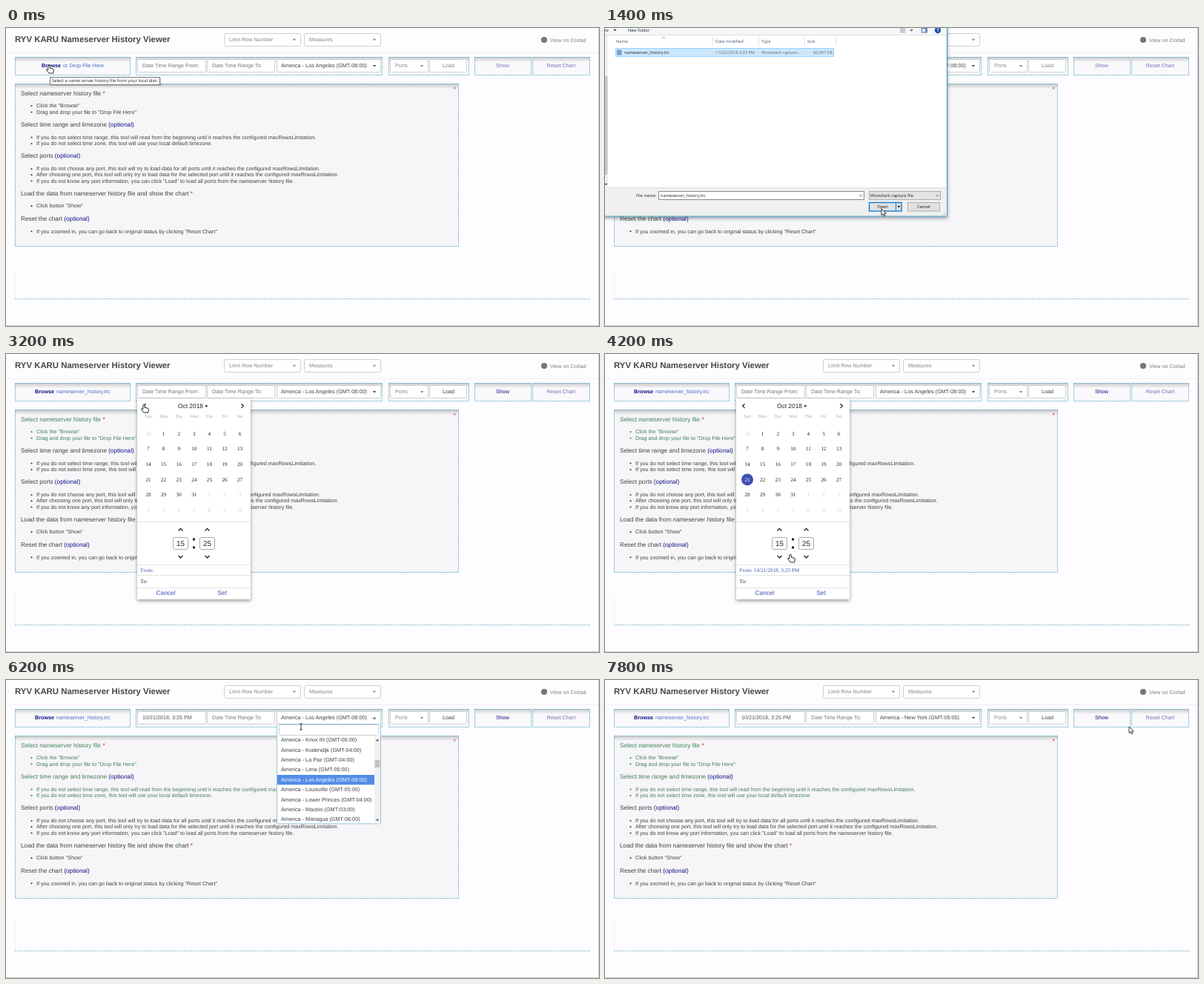
An HTML page for the animation above (8000 ms loop, 800 by 402 pixels).

```html
<!DOCTYPE html>
<html lang="en">
<head>
<meta charset="utf-8">
<title>Nameserver History Viewer</title>
<style>
  html, body { margin: 0; width: 100%; height: 100%; overflow: hidden; background: #fdfcfe; }
  svg { display: block; }
  text { font-family: "Liberation Sans", Arial, sans-serif; text-rendering: geometricPrecision; white-space: pre; }
  .serif { font-family: "Liberation Serif", "Times New Roman", serif; }
  .ui { font-family: "Open Sans", "Noto Sans", sans-serif; }
</style>
</head>
<body>
<svg id="stage" width="800" height="402" viewBox="0 0 800 402"></svg>
<script>
const LOOP = 8000, STEP = 200;
const INK = '#404042', NAVY = '#10108a', GREEN = '#41805a', GREY = '#858585', TEAL = '#5fb0cb', INDIGO = '#3f51b5';

// Each track is a list of [start in ms, value]; a value holds until the next one.
const tracks = {
  tip: [[0, true], [400, false]],
  dialog: [[0, false], [800, true], [1600, false]],
  fileChosen: [[0, false], [1200, true]],
  loaded: [[0, false], [1800, true]],
  focus: [[0, false], [2400, true], [2600, false]],
  calendar: [[0, null], [2600, 'Nov'], [3200, 'Oct'], [4600, null]],
  picked: [[0, false], [3800, true]],
  dated: [[0, false], [4600, true]],
  query: [[0, null], [6200, ''], [6800, 'n'], [7000, 'ne'], [7200, 'new'], [7800, null]],
  zone: [[0, 'America - Los Angeles (GMT-08:00)'], [7800, 'America - New York (GMT-05:00)']],
  cursor: [
    [0, ['hand', 58, 50]], [800, ['arrow', 59, 51]], [1000, ['arrow', 66, 33]],
    [1400, ['arrow', 373, 244]], [1800, ['arrow', 340, 180]], [2000, ['arrow', 286, 110]],
    [2200, ['hand', 246, 57]], [2400, ['hand', 232, 50]], [2800, ['hand', 206, 62]],
    [3000, ['hand', 186, 68]], [3600, ['hand', 192, 168]], [4200, ['hand', 250, 270]],
    [4400, ['hand', 293, 321]], [4600, ['arrow', 296, 324]], [5000, ['arrow', 305, 328]],
    [5200, ['arrow', 330, 268]], [5400, ['arrow', 384, 120]], [5600, ['hand', 398, 51]],
    [6200, ['beam', 398, 63]], [7200, ['arrow', 410, 84]], [7400, ['arrow', 414, 94]],
    [7800, ['arrow', 707, 63]]
  ]
};

const zones = {
  '': ['Knox IN -06', 'Kralendijk -04', 'La Paz -04', 'Lima -05', 'Los Angeles -08', 'Louisville -05',
    'Lower Princes -04', 'Maceio -03', 'Managua -06'].map(z => 'America - ' + z),
  n: ['Abidjan +00', 'Bangui +01', 'Banjul +00', 'Conakry +00', 'Gaborone +02', 'Johannesburg +02',
    'Kinshasa +01', 'Luanda +01', 'Mbabane +02'].map(z => 'Africa - ' + z),
  ne: ['Africa - Gaborone +02', 'Africa - Johannesburg +02', 'America - New Salem -06',
    'America - New York -05', 'Asia - Brunei +08'],
  new: ['America - New Salem -06', 'America - New York -05']
};

const help = [
  [88, 'Select nameserver history file', '*', [[105, 'Click the "Browse"'], [113.5, 'Drag and drop your file to "Drop File Here"']]],
  [130, 'Select time range and timezone', 'opt', [
    [147.5, 'If you do not select time range, this tool will read from the beginning until it reaches the configured maxRowsLimitation.'],
    [156, 'If you do not select time zone, this tool will use your local default timezone.']]],
  [172.5, 'Select ports', 'opt', [
    [190, 'If you do not choose any port, this tool will try to load data for all ports until it reaches the configured maxRowsLimitation.'],
    [198.2, 'After choosing one port, this tool will only try to load data for the selected port until it reaches the configured maxRowsLimitation.'],
    [206.5, 'If you do not know any port information, you can click "Load" to load all ports from the nameserver history file.']]],
  [223, 'Load the data from nameserver history file and show the chart', '*', [[240.2, 'Click button "Show"']]],
  [257, 'Reset the chart', 'opt', [[274.3, 'If you zoomed in, you can go back to original status by clicking "Reset Chart"']]]
];

const now = (name, t) => tracks[name].filter(s => s[0] <= t).pop()[1];

// Text is placed by its vertical middle.
const text = (x, y, s, fill = INK, size = 7.2, more = '') =>
  `<text x="${x}" y="${y + size * 0.31}" fill="${fill}" font-size="${size}" ${more}>${s}</text>`;
const mid = (x, y, s, fill, size, more = '') => text(x, y, s, fill, size, 'text-anchor="middle" ' + more);
const ui = (x, y, s, fill = '#222', more = '') => text(x, y, s, fill, 5.7, 'class="ui" ' + more);
const box = (x, y, x2, y2, fill, stroke = 'none', more = '') =>
  `<rect x="${x}" y="${y}" width="${x2 - x}" height="${y2 - y}" fill="${fill}" stroke="${stroke}" ${more}/>`;
const line = (d, stroke, width = 1, more = '') =>
  `<path d="${d}" fill="none" stroke="${stroke}" stroke-width="${width}" ${more}/>`;
const caret = (x, y, fill, up) =>
  `<path d="M${x - 2.2} ${y + (up ? 1.2 : -1.2)}h4.4l-2.2 ${up ? -2.5 : 2.5}z" fill="${fill}"/>`;
const field = (x, y, x2, y2, stroke = '#d0d0d2') => box(x + .5, y + .5, x2 - .5, y2 - .5, '#fff', stroke, 'rx="2"');
const panel = (x, y, x2, y2, fill = '#f9f8fa') =>
  box(x, y, x2, y2, fill) + box(x, y, x2, y + 7, 'url(#shade)') +
  box(x + .5, y + .5, x2 - .5, y2 - .5, 'none', TEAL, 'stroke-width=".85" stroke-dasharray="2 1"');

const defs = `<defs>
  <linearGradient id="shade" x2="0" y2="1"><stop stop-color="#000" stop-opacity=".2"/><stop offset="1" stop-color="#000" stop-opacity="0"/></linearGradient>
  <filter id="drop" x="-10%" y="-10%" width="120%" height="120%"><feDropShadow dx="0" dy="2" stdDeviation="2.5" flood-opacity=".4"/></filter>
</defs>`;

function header() {
  const select = (x, x2, label) =>
    field(x, 7, x2, 25) + text(x + 7, 16, label, GREY) + caret(x2 - 9, 16, GREY);
  return text(12, 15.8, 'RYV KARU Nameserver History Viewer', '#484848', 11.4, 'font-weight="bold"') +
    select(294, 398, 'Limit Row Number') + select(402, 506, 'Measures') +
    '<circle cx="726" cy="16" r="4.1" fill="#777"/>' + text(734, 16.3, 'View on Corlad', '#808080') +
    line('M0 33.5H800', '#f0eff2') + line('M799.5 0V402M0 401.5H800', '#cfcfd3');
}

function toolbar(s) {
  const bold = 'font-weight="bold"', link = '#4a6cc8', hint = '#737373';
  const browse = s.loaded
    ? text(39, 51, 'Browse', NAVY, 7.2, bold) + text(68, 51, 'nameserver_history.trc', link)
    : text(48, 51, 'Browse', NAVY, 7.2, bold) + text(77, 51, 'or Drop File Here', link);
  const open = s.query !== null;
  return panel(12, 39, 168, 64) + browse +
    panel(175, 39, 508, 64) +
    field(177, 42, 270, 60, s.focus ? '#66afe9' : undefined) +
    (s.dated ? text(184, 51, '10/21/2018, 3:25 PM', '#505050') : text(184, 51, 'Date Time Range From:', hint)) +
    field(271, 42, 363, 60) + text(278, 51, 'Date Time Range To:', hint) +
    field(365, 42, 506, 60) + text(371, 51, s.zone, INK, 7.28) + caret(497, 51.3, INK, open) +
    panel(516, 39, 625, 64) +
    field(518, 42, 570, 60) + text(525, 51, 'Ports', GREY) + caret(561, 51.3, GREY) +
    field(571, 42, 622, 60) + mid(597, 51, 'Load', s.loaded ? INK : GREY) +
    panel(632, 39, 709, 64) + mid(670, 51, 'Show', s.loaded ? NAVY : '#7373bd') +
    panel(710, 39, 788, 64) + mid(749, 51, 'Reset Chart', '#7870bb');
}

function guide(s) {
  const done = [s.loaded, s.dated];
  const sections = help.map(([y, title, mark, items], i) => {
    const ink = done[i] ? GREEN : INK;
    const tail = mark === '*' ? '<tspan fill="#d02030"> *</tspan>' : `<tspan fill="${NAVY}"> (optional)</tspan>`;
    return text(20, y, title + tail, ink, 8.25) + items.map(([cy, label]) =>
      `<circle cx="34.5" cy="${cy}" r="1.1" fill="${ink}"/>` + text(41, cy, label, ink)).join('');
  });
  return panel(12, 75, 611, 295, '#f6f5f7') + sections.join('') +
    line('M603.8 79.8l2.8 2.8m0-2.8l-2.8 2.8', '#d9606a') +
    line('M12.5 324V365', '#f2f1f4') + line('M12 365.5H788', '#7fb6c8', .85, 'stroke-dasharray="2 1"');
}

function fileDialog(s) {
  const name = 'nameserver_history.trc';
  const row = s.fileChosen ? box(14.5, 27.5, 308.5, 38.5, '#cce8ff', '#99d1ff') : '';
  return '<g filter="url(#drop)">' + box(-4, -20, 461.5, 254, '#f0f0f0', '#3fa0cf') + '</g>' +
    box(0, 0, 461, 9, '#f5f6f7') + box(4, 10, 460, 215, '#fff') + line('M0 9.5H461M4 215.5H461', '#dedede') +
    box(0, 10, 4, 215, '#f0f0f0') + box(0, 65, 3.5, 198, '#c6c6c6') +
    caret(1.5, 211, '#555') +
    ui(-9, 3, 'anize', '#1a2f50') + caret(13.5, 3, '#333') + ui(31, 3, 'New folder', '#1a2f50') +
    line('M398 1h7M398 3.2h7M398 5.4h7', '#7d8ba0', .9) + caret(413.5, 3.2, '#555') +
    box(427.5, .5, 434.5, 6, '#fff', '#4a6f9e') + box(431.5, .5, 434.5, 6, '#6f9bd0') +
    '<circle cx="449" cy="3" r="4.2" fill="#1c50b0"/>' + mid(449, 3, '?', '#fff', 6, 'font-weight="bold"') +
    line('M76.8 13.8l2.2-2 2.2 2', '#777', .7) +
    ui(15, 18, 'Name', '#44587a') + ui(149, 18, 'Date modified', '#44587a') +
    ui(211, 18, 'Type', '#44587a') + ui(273, 18, 'Size', '#44587a') +
    line('M145.5 12V24M207.5 12V24M269.5 12V24M311.5 12V24', '#e3e3e3') +
    row + box(16, 29.5, 22.5, 36.5, '#7b9fc4') + ui(26, 33, name) +
    ui(149, 33, '11/22/2018 3:23 PM', '#666') + ui(211, 33, 'Wireshark capture...', '#666') +
    ui(307, 33, '66,097 KB', '#666', 'text-anchor="end"') +
    ui(42, 226, 'File name:') + box(72.5, 220.5, 349.5, 231.5, '#fff', '#8a8a8a') +
    (s.fileChosen ? ui(75, 226, name) : '') + line('M343 225l2.2 2.2 2.2-2.2', '#555', .8) +
    box(356.5, 220.5, 452.5, 231.5, '#e4e4e4', '#adadad') + ui(358, 226, 'Wireshark capture file') +
    line('M446 225l2.2 2.2 2.2-2.2', '#555', .8) +
    box(356.5, 235.5, 400, 247, '#e1e1e1', '#0078d7', 'stroke-width="1.3"') + line('M392.5 236V247', '#0078d7') +
    ui(374.5, 241, 'Open', '#111', 'text-anchor="middle"') + caret(396.3, 241.3, '#222') +
    box(408.5, 235.5, 451.5, 247, '#e1e1e1', '#adadad') + ui(430, 241, 'Cancel', '#111', 'text-anchor="middle"') +
    line('M456 252.5l3.5-3.5M458.3 252.5l1.2-1.2', '#aaa', .8);
}

function calendar(s) {
  const serif = 'class="serif"';
  const [lead, before, days] = s.calendar === 'Oct' ? [1, 30, 31] : [4, 31, 30];
  const colX = c => 192 + c * 20.6;
  let out = '<g filter="url(#drop)">' + box(177, 60, 330, 331, '#fff') + '</g>' +
    text(232, 70, s.calendar + ' 2018', '#222', 8.4) + caret(270.3, 70.5, '#222') +
    line('M188.5 67.3l-2.8 2.8 2.8 2.8M317.5 67.3l2.8 2.8-2.8 2.8', '#222', 1.3);
  ['Sun', 'Mon', 'Tue', 'Wed', 'Thu', 'Fri', 'Sat'].forEach((d, c) => out += mid(colX(c), 84, d, '#a5a5a5', 6, serif));
  for (let i = 0; i < 42; i++) {
    const n = i - lead + 1, inside = n > 0 && n <= days;
    const label = n < 1 ? before + n : inside ? n : n - days;
    const x = colX(i % 7), y = 107.5 + Math.floor(i / 7) * 20.65;
    const chosen = s.picked && n === 21;
    if (chosen) out += `<circle cx="${x}" cy="${y}" r="8" fill="${INDIGO}"/>`;
    out += mid(x, y, label, chosen ? '#fff' : inside ? '#222' : '#cfcfcf', 7.2, serif);
  }
  for (const [x, v] of [[235.5, 15], [271.5, 25]]) {
    out += box(x - 10, 247.5, x + 10, 263.5, '#fff', '#aaa', 'rx="2"') + mid(x, 255.9, v, '#222', 9.8) +
      line(`M${x - 3} 238.5l3-3 3 3M${x - 3} 272l3 3 3-3`, '#222', 1.3);
  }
  return out + box(252, 248.5, 255, 251.5, '#222') + box(252, 259.5, 255, 262.5, '#222') +
    line('M177 226.5H330M177 284.5H330M177 298.5H330M177 315.5H330', '#e4e4e4') +
    text(181.5, 291.3, 'From:' + (s.picked ? ' 10/21/2018, 3:25 PM' : ''), INDIGO, 7.2, serif) +
    text(181.5, 306.3, 'To:', '#222', 7.2, serif) +
    mid(215.5, 322.5, 'Cancel', INDIGO, 8.4) + mid(291.5, 322.5, 'Set', INDIGO, 8.4);
}

function zoneList(s) {
  const list = zones[s.query], full = list.length === 9, rowH = 13.4;
  const bottom = 73.3 + rowH * list.length;
  const hot = s.query === '' ? 4 : s.query === 'new' && s.cursor[2] > 90 ? 1 : 0;
  const right = full ? 497 : 505;
  let out = box(365.5, 59.5, 505.5, bottom, '#fff', '#9dc3dc', 'rx="1.5"') +
    field(368, 60, 503, 75) + text(371, 67.5, s.query);
  list.forEach((z, i) => {
    const y = 81 + i * rowH;
    if (i === hot) out += box(366, y - 6.6, right, y + 6.7, '#538ce8');
    out += text(371, y, `${z.slice(0, -4)} (GMT${z.slice(-3)}:00)`, i === hot ? '#fff' : INK, 7.28);
  });
  if (full) {
    out += box(497, 76, 505, bottom - .5, '#f1f1f1') + box(497.5, s.query ? 84 : 108, 504.5, s.query ? 94 : 118, '#c1c1c1') +
      caret(501, 81, '#505050', true) + caret(501, 189, '#505050');
  }
  return out;
}

const tooltip = () => box(61, 67.5, 209.5, 78, '#000', 'none', 'opacity=".15"') +
  box(59.5, 66.5, 207.5, 76.5, '#fff', '#777') +
  text(62, 71.3, 'Select a name server history file from your local disk.', '#222', 5.83, 'class="ui"');

const pointers = {
  arrow: '<path d="M0 0v8.6l2-1.9 1.5 3.2 1.5-.7-1.5-3.1h2.8z" fill="#fff" stroke="#111" stroke-width=".8"/>',
  hand: '<path d="M-1.2.9q1.2-1.7 2.4 0v3.3l3.7.9q1.6.5 1.5 2l-.8 3.9h-5.6l-3.3-4.3q-.3-1.5 1.2-1.1l.9.9z" fill="#fff" stroke="#111" stroke-width=".9"/>',
  beam: line('M-1.8-4h3.6M0-4v8M-1.8 4h3.6', '#222', .9)
};

function draw(t) {
  const s = {};
  for (const name in tracks) s[name] = now(name, t);
  const [kind, x, y] = s.cursor;
  return defs + box(0, 0, 800, 402, '#fdfcfe') + header() + toolbar(s) + guide(s) +
    (s.dialog ? fileDialog(s) : '') + (s.calendar ? calendar(s) : '') +
    (s.query !== null ? zoneList(s) : '') + (s.tip ? tooltip() : '') +
    `<g transform="translate(${x} ${y})">${pointers[kind]}</g>`;
}

const stage = document.getElementById('stage');
const start = performance.now();
let shown = -1;
function tick() {
  const step = Math.floor(((performance.now() - start) % LOOP) / STEP);
  if (step !== shown) stage.innerHTML = draw((shown = step) * STEP);
  requestAnimationFrame(tick);
}
tick();
</script>
</body>
</html>
```
